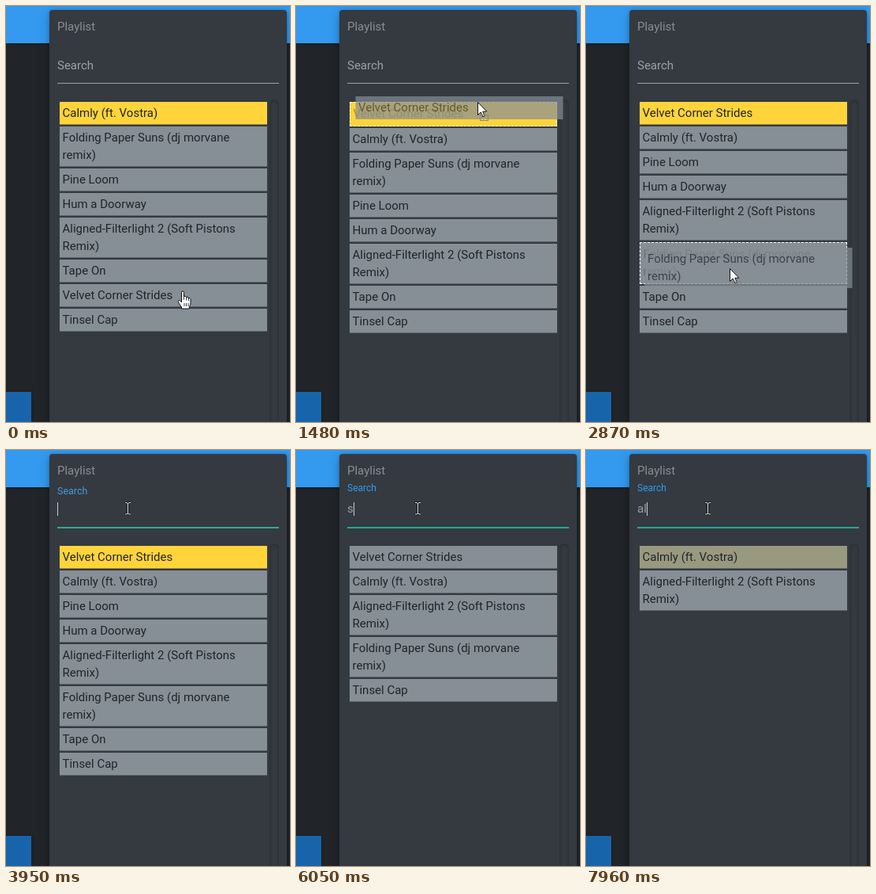
Recreate the animation shown at these times as an HTML page. Size 360 by 525 pixels, loop 8000 ms.

```html
<!DOCTYPE html>
<html lang="en">
<head>
<meta charset="utf-8">
<title>Playlist</title>
<style>
html, body { margin: 0; width: 100%; height: 100%; overflow: hidden; background: #212529; }
#stage { position: relative; width: 360px; height: 525px; overflow: hidden; background: #212529;
  font: 15px/22px Roboto, sans-serif; color: #212529; }
#stage * { position: absolute; box-sizing: border-box; }
.bar { left: 0; top: 0; width: 360px; height: 47px; background: #339af0; box-shadow: 0 2px 4px rgba(0,0,0,.2); }
.block { left: 0; top: 487px; width: 32px; height: 38px; background: #1864ab; box-shadow: 0 0 4px rgba(0,0,0,.25); }
.panel { left: 55px; top: 5px; width: 301px; height: 540px; background: #343a40; border-radius: 4px;
  box-shadow: 0 4px 14px rgba(0,0,0,.25), 0 1px 4px rgba(0,0,0,.2); }
.title { left: 65px; top: 15px; color: #868e96; }
#label { left: 65px; top: 64px; transform-origin: 0 50%; white-space: nowrap; }
#line { left: 65px; top: 97px; width: 281px; height: 1px; background: #9e9e9e; }
#input { left: 65px; top: 63px; height: 22px; white-space: pre; color: #9a9fa4; }
#caret { left: 100%; top: 3px; width: 1px; height: 17px; background: #c8ccd0; }
.track { left: 334px; top: 118px; width: 12px; height: 430px; border-radius: 7px;
  box-shadow: inset 0 0 5px rgba(0,0,0,.3); }
.item { left: 68px; width: 263px; padding: 3px 0 0 3.5px; white-space: pre; background: #868e96;
  border-bottom: 1px solid #5d646b; }
.item.first { background: #ffd43b; border-bottom-color: #9a8439; }
.item.tint { background: #999980; }
.item.held { border: 1px dashed #fff; color: rgba(33,37,41,.4); }
#ghost { left: 0; top: 0; opacity: .7; border-bottom: 0; }
#stage svg { left: 0; top: 0; overflow: visible; }
</style>
</head>
<body>
<div id="stage">
  <div class="bar"></div>
  <div class="block"></div>
  <div class="panel"></div>
  <div class="title">Playlist</div>
  <div id="label">Search</div>
  <div id="input"><span id="typed" style="position:static"></span><i id="caret"></i></div>
  <div id="line"></div>
  <div class="track"></div>
  <div id="list"></div>
  <div id="ghost" class="item"></div>
  <svg id="pointer" width="1" height="1">
    <g id="hand" fill="#fff" stroke="#111" stroke-linejoin="round">
      <path d="M-1.5 11V1.5Q-1.5 0 0 0T1.5 1.5V7Q2 6 3.2 6.2T4.6 8Q5 7 6.2 7.3T7.6 9Q8.2 8.2 9.2 8.7T10 10.5V15Q10 17.5 8.3 19.5V22H-1.5V20L-5.5 14Q-6.3 12.2-5 11.5T-2.8 12.3L-1.5 14Z"/>
      <path d="M1.5 7v4M4.6 8v3.5M7.6 9v3M2 15v4M4.5 15v4M7 15v4" fill="none" stroke-width=".8"/>
    </g>
    <g id="arrow">
      <path d="M.5 .5V16.5L4.2 13L6.8 18.8L9.3 17.7L6.8 12.2H11.8Z" fill="#fff" stroke="#111"/>
      <g id="parcel" fill="none">
        <rect x="3.5" y="16.5" width="10" height="7" stroke="#fff"/>
        <rect x="3.5" y="16.5" width="10" height="7" stroke="#111" stroke-dasharray="1 1"/>
      </g>
    </g>
    <g id="beam" fill="none">
      <path d="M-3.5-7.5H-1L.5-6.5L2-7.5H4M.5-7V6.5M-3.5 7H-1L.5 6L2 7H4" stroke="#111" stroke-width="2.6"/>
      <path d="M-3-7.5H-1L.5-6.5L2-7.5H4M.5-7V6.5M-3 7H-1L.5 6L2 7H4" stroke="#e6e6e6"/>
    </g>
  </svg>
</div>
<script>
const LOOP = 8000, TOP = 121;
const $ = id => document.getElementById(id);

const songs = [
  'Calmly (ft. Vostra)',
  'Folding Paper Suns (dj morvane\nremix)',
  'Pine Loom',
  'Hum a Doorway',
  'Aligned-Filterlight 2 (Soft Pistons\nRemix)',
  'Tape On',
  'Velvet Corner Strides',
  'Tinsel Cap'
];

// time, x, y of the pointer's hot spot
const path = [
  [0, 224, 360], [79, 224, 360], [80, 224, 361], [400, 224, 360], [700, 227, 285],
  [1170, 232, 148], [1250, 231, 136], [1480, 230, 121], [1720, 230, 121],
  [1800, 226, 140], [1880, 204, 190], [1960, 169, 229], [2030, 175, 210],
  [2110, 175, 209], [2400, 177, 250], [2650, 181, 305], [2870, 182, 331],
  [3050, 182, 331], [3250, 175, 250], [3450, 160, 115], [3600, 154, 73],
  [3739, 154, 73], [3740, 154, 74]
];

// from, to, song, grip offset inside the row
const drags = [
  { from: 400, to: 1630, song: 6, dx: 154.5, dy: 7 },
  { from: 2180, to: 3020, song: 1, dx: 107.5, dy: 26 }
];

const typing = [[0, ''], [4810, 's'], [4960, 'sl'], [5110, 'sli'], [5740, 'sl'], [5970, 's'],
  [6200, ''], [6510, 'a'], [6660, 'al'], [6820, 'ali'], [7810, 'al']];
const queries = [[0, ''], [4960, 's'], [5110, 'sl'], [5970, 's'], [6270, ''],
  [6590, 'a'], [6740, 'al'], [6820, 'ali'], [7960, 'al']];

const rows = songs.map(text => {
  const el = document.createElement('div');
  el.textContent = text;
  $('list').append(el);
  return el;
});

const height = song => songs[song].includes('\n') ? 51 : 29;
const at = (table, t) => table.filter(row => row[0] <= t).pop()[1];
const show = (el, on) => { el.style.display = on ? '' : 'none'; };
const mix = (a, b, p) => `rgb(${a.map((v, i) => Math.round(v + (b[i] - v) * p))})`;

function pointerAt(t) {
  const i = path.findIndex(p => p[0] > t);
  if (i < 0) return path[path.length - 1].slice(1);
  const [t0, x0, y0] = path[i - 1], [t1, x1, y1] = path[i];
  const p = (t - t0) / (t1 - t0);
  return [x0 + (x1 - x0) * p, y0 + (y1 - y0) * p];
}

// Puts a song where the top edge of its ghost falls among the other rows.
function reorder(order, song, ghostTop) {
  const rest = order.filter(s => s !== song);
  let y = TOP, index = 0;
  for (const s of rest) {
    if (y + height(s) / 2 < ghostTop) index++;
    y += height(s) + 2;
  }
  rest.splice(index, 0, song);
  return rest;
}

function drawList(t) {
  let order = songs.map((_, i) => i), held = -1;
  for (const d of drags) {
    if (t < d.from) break;
    const [x, y] = pointerAt(Math.min(t, d.to));
    order = reorder(order, d.song, y - d.dy);
    if (t < d.to) {
      held = d.song;
      $('ghost').textContent = songs[held];
      $('ghost').style.height = height(held) + 'px';
      $('ghost').style.transform = `translate(${x - d.dx}px, ${Math.round(y - d.dy)}px)`;
    }
  }
  show($('ghost'), held >= 0);

  const query = at(queries, t);
  const shown = order.filter(s => songs[s].toLowerCase().includes(query));
  let y = TOP;
  rows.forEach(el => show(el, false));
  shown.forEach((s, i) => {
    const el = rows[s], h = height(s) + (s === held ? 2 : 0);
    const mark = i ? '' : query ? (t >= 7960 ? ' tint' : '') : ' first';
    el.className = 'item' + mark + (s === held ? ' held' : '');
    el.style.top = y + 'px';
    el.style.height = h + 'px';
    show(el, true);
    y += h + 2;
  });
  return held >= 0;
}

function drawSearch(t) {
  const p = Math.min(1, Math.max(0, (t - 3830) / 200));
  const e = 1 - (1 - p) ** 2;
  $('label').style.transform = `translateY(${-27 * e}px) scale(${1 - .2 * e})`;
  $('label').style.color = mix([158, 160, 162], [51, 154, 240], e);
  $('line').style.background = mix([158, 158, 158], [38, 166, 154], e);
  $('line').style.height = p > .3 ? '2px' : '1px';
  $('typed').textContent = at(typing, t);
  show($('caret'), t >= 3890 && t < 4410 || t >= 4810);
}

function drawPointer(t, dragging) {
  const [x, y] = pointerAt(t).map(Math.round);
  const kind = dragging ? 'arrow' : y < 98 ? 'beam' : y >= TOP && y < 411 ? 'hand' : 'arrow';
  for (const id of ['hand', 'arrow', 'beam']) show($(id), id === kind);
  show($('parcel'), dragging);
  $('pointer').style.transform = `translate(${x}px, ${y}px)`;
}

const start = performance.now();
function frame() {
  const t = (performance.now() - start) % LOOP;
  const dragging = drawList(t);
  drawSearch(t);
  drawPointer(t, dragging);
  requestAnimationFrame(frame);
}
frame();
</script>
</body>
</html>
```
